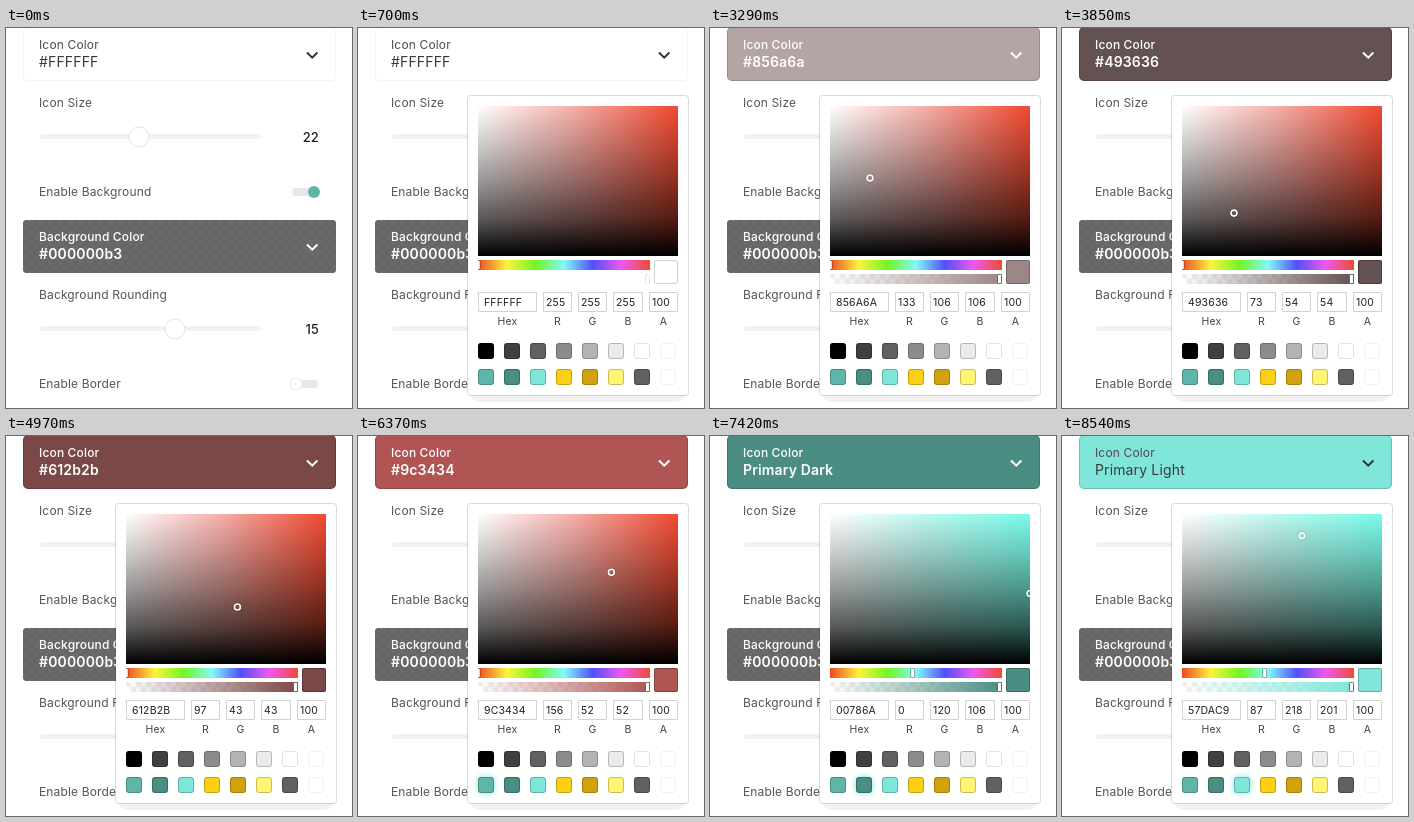
These frames come from a looping animation (346x380 px, 8750 ms). An HTML page with a canvas:

```html
<!DOCTYPE html>
<html lang="en">
<head>
<meta charset="utf-8">
<title>Icon color settings</title>
<style>
  html, body { margin: 0; width: 100%; height: 100%; overflow: hidden; background: #fff; }
  canvas { display: block; width: 346px; height: 380px; }
</style>
</head>
<body>
<canvas id="stage"></canvas>
<script>
const W = 346, H = 380, LOOP = 8750, STEP = 70;
const FONT = 'Inter, "Open Sans", sans-serif';
const canvas = document.getElementById('stage');
const ctx = canvas.getContext('2d');
const dpr = window.devicePixelRatio || 1;
canvas.width = W * dpr;
canvas.height = H * dpr;

const TEAL = [95, 181, 170], TEAL_DARK = [74, 141, 130], TEAL_LIGHT = [128, 230, 218];
const PICKER = { x: 120, y: 78, w: 200, h: 150 };
const STRIP = { x: 120, w: 172 };
const GRAYS = ['#000', '#404040', '#606060', '#8c8c8c', '#b3b3b3', '#ebebeb', '#fff', '#fff'];
const BRAND = [css(TEAL), css(TEAL_DARK), css(TEAL_LIGHT), '#fbcf16', '#d2a20c', '#fff573', '#606060', '#fff'];
const SHADES = [0, 0.25, 0.5, 0.75, 1].map(d => `rgba(0,0,0,${1 - Math.pow(1 - d, 0.75)})`);

// Selected colours: start, fade length, saturation, value; "drag" moves the handle too.
const PICKS = [
  { at: -1, fade: 1, s: 0, v: 1 },
  { at: 3080, fade: 280, s: 0.2, v: 0.52 },
  { at: 3640, fade: 180, s: 0.26, v: 0.286, rgb: [73, 54, 54], drag: true },
  { at: 4060, fade: 420, s: 0.557, v: 0.286, drag: true },
  { at: 4690, fade: 260, s: 0.557, v: 0.38, rgb: [97, 43, 43], drag: true },
  { at: 5180, fade: 350, s: 0.6, v: 0.612, drag: true },
  { at: 5740, fade: 140, s: 0.667, v: 0.612, rgb: [156, 52, 52], drag: true },
  { at: 6440, fade: 140, s: 1, v: 0.659, rgb: [0, 168, 152], shown: TEAL, name: 'Primary' },
  { at: 7000, fade: 210, s: 1, v: 0.47, rgb: [0, 120, 106], shown: TEAL_DARK, name: 'Primary Dark' },
  { at: 7980, fade: 210, s: 0.6, v: 0.855, rgb: [87, 218, 201], shown: TEAL_LIGHT, name: 'Primary Light' }
];
const HOVERS = [6090, 6860, 7770];

function css(c, a = 1) { return `rgba(${c.map(Math.round).join(',')},${a})`; }
function clamp(n) { return Math.max(0, Math.min(1, n)); }
function mix(a, b, p) { return a + (b - a) * p; }
function mixRgb(a, b, p) { return a.map((n, i) => mix(n, b[i], p)); }
function redTone(s, v) { const low = Math.round(255 * v * (1 - s)); return [Math.round(255 * v), low, low]; }
function hex(rgb) { return rgb.map(n => n.toString(16).padStart(2, '0')).join(''); }
function rgbOf(p) { return p.rgb || redTone(p.s, p.v); }
function shownOf(p) { return p.shown || onScreen(rgbOf(p)); }

// Lighter and slightly less saturated, as the colours appear in the panel.
function onScreen(rgb) {
  const light = rgb.map(n => 255 * Math.pow(n / 255, 0.75));
  const top = Math.max(...light);
  return light.map(n => mix(n, top, 0.07));
}

function stateAt(t) {
  const i = PICKS.findLastIndex(p => t >= p.at);
  const now = PICKS[i], prev = PICKS[Math.max(0, i - 1)];
  const p = clamp((t - now.at) / now.fade);
  const moving = now.drag && p < 1;
  const s = moving ? mix(prev.s, now.s, p) : now.s;
  const v = moving ? mix(prev.v, now.v, p) : now.v;
  const rgb = moving ? redTone(s, v) : rgbOf(now);
  const code = hex(rgb);
  return {
    s, v, rgb, code,
    white: i === 0,
    teal: !!now.name,
    label: now.name || '#' + (i ? code : code.toUpperCase()),
    shown: moving ? onScreen(rgb) : shownOf(now),
    header: mixRgb(shownOf(prev), shownOf(now), p),
    dark: rgb[0] * 0.299 + rgb[1] * 0.587 + rgb[2] * 0.114 < 128
  };
}

function box(x, y, w, h, r, fill, stroke) {
  ctx.beginPath();
  ctx.roundRect(x, y, w, h, r);
  if (fill) { ctx.fillStyle = fill; ctx.fill(); }
  if (stroke) { ctx.lineWidth = 1; ctx.strokeStyle = stroke; ctx.stroke(); }
}

// Filled box with a one pixel border inside its edge.
function framed(x, y, w, h, r, fill, stroke) {
  box(x, y, w, h, r, fill);
  box(x + 0.5, y + 0.5, w - 1, h - 1, Math.max(0, r - 0.5), null, stroke);
}

function disc(x, y, r, fill, stroke, width = 1) {
  ctx.beginPath();
  ctx.arc(x, y, r, 0, Math.PI * 2);
  if (fill) { ctx.fillStyle = fill; ctx.fill(); }
  if (stroke) { ctx.lineWidth = width; ctx.strokeStyle = stroke; ctx.stroke(); }
}

function text(str, x, y, size, color = '#555', weight = 400, align = 'left') {
  ctx.font = `${weight} ${size}px ${FONT}`;
  ctx.letterSpacing = '0.15px';
  ctx.textAlign = align;
  ctx.fillStyle = color;
  ctx.fillText(str, x, y);
}

function clipped(x, y, w, h, r, draw) {
  ctx.save();
  ctx.beginPath();
  ctx.roundRect(x, y, w, h, r);
  ctx.clip();
  draw();
  ctx.restore();
}

function checker(x, y, w, h, cell, color) {
  ctx.fillStyle = color;
  for (let r = 0; r * cell < h; r++)
    for (let c = r % 2; c * cell < w; c += 2) ctx.fillRect(x + c * cell, y + r * cell, cell, cell);
}

function gradient(x0, y0, x1, y1, colors) {
  const g = ctx.createLinearGradient(x0, y0, x1, y1);
  colors.forEach((c, i) => g.addColorStop(i / (colors.length - 1), c));
  return g;
}

function heading(title, value, y, dark) {
  text(title, 33, y + 21, 12, dark ? '#fff' : '#4c4c4c', dark ? 500 : 400);
  text(value, 33, y + 39, 14, dark ? '#fff' : '#3a3a3a', dark ? 600 : 400);
  ctx.beginPath();
  ctx.moveTo(301, y + 24.5);
  ctx.lineTo(306.2, y + 29.7);
  ctx.lineTo(311.4, y + 24.5);
  ctx.lineWidth = 2;
  ctx.strokeStyle = dark ? '#fff' : '#333';
  ctx.stroke();
}

function slider(title, y, knob, value) {
  text(title, 33, y, 12);
  box(34, y + 27, 221, 5, 2.5, '#f2f2f2');
  disc(knob, y + 30, 10, '#fff', '#e4e4e4');
  text(value, 313, y + 35, 13, '#222', 500, 'right');
}

function toggle(title, y, on) {
  text(title, 33, y + 4, 12);
  box(286, y - 4, 26, 8, 4, '#e8e8e8');
  if (on) disc(308, y, 6, css(TEAL));
  else disc(290, y, 6, '#fff', '#e6e6e6');
}

function drawPanel(state) {
  framed(17, -1, 313, 54, 5, css(state.header), state.white ? '#f3f3f3' : 'rgba(0,0,0,.16)');
  heading('Icon Color', state.label, 0, state.dark);
  slider('Icon Size', 79, 133, '22');
  toggle('Enable Background', 164, true);
  clipped(17, 192, 313, 53, 4, () => {
    ctx.fillStyle = '#6a6a6a';
    ctx.fillRect(17, 192, 313, 53);
    checker(17, 192, 313, 53, 5, '#666');
  });
  heading('Background Color', '#000000b3', 192, true);
  slider('Background Rounding', 271, 169, '15');
  toggle('Enable Border', 356, false);
}

function drawField(state) {
  const { x, y, w, h } = PICKER;
  const hues = state.teal ? ['#fff', '#b9f9f0', '#78fce8'] : ['#fff', '#f6aaa4', '#f04a30'];
  clipped(x, y, w, h, 0, () => {
    ctx.fillStyle = gradient(x, y, x + w, y, hues);
    ctx.fillRect(x, y, w, h);
    ctx.fillStyle = gradient(x, y, x, y + h, SHADES);
    ctx.fillRect(x, y, w, h);
    const hx = x + w * state.s, hy = y + h * (1 - state.v);
    if (!state.white) disc(hx, hy, 4, null, 'rgba(0,0,0,.3)');
    disc(hx, hy, 3, null, '#fff', 1.6);
  });
}

function drawStrips(state) {
  const { x, w } = STRIP;
  clipped(x, 232, w, 10, 0, () => {
    ctx.fillStyle = gradient(x, 0, x + w, 0,
      ['#ee4a24', '#fdf33c', '#73f520', '#80fafa', '#5050f8', '#ef58f0', '#ee4a34']);
    ctx.fillRect(x, 232, w, 10);
    box(x + (state.teal ? w * 173 / 360 : 0) - 2, 232.5, 4, 9, 1, '#fff', 'rgba(0,0,0,.35)');
  });
  if (!state.white) {
    clipped(x, 246, w, 10, 0, () => {
      checker(x, 246, w, 10, 5, '#f1f1f1');
      ctx.fillStyle = gradient(x, 0, x + w, 0, [css(state.shown, 0), css(state.shown)]);
      ctx.fillRect(x, 246, w, 10);
    });
  }
  box(287.5, 246.5, 4, 9, 1, '#fff', state.white ? '#e6e6e6' : '#666');
  framed(296, 232, 24, 24, 2, css(state.shown), state.white ? '#d0d0d0' : 'rgba(0,0,0,.25)');
}

function drawInputs(state) {
  const fields = [
    [120, 59, 'Hex', state.code.toUpperCase()],
    [185, 29, 'R', state.rgb[0]], [220, 29, 'G', state.rgb[1]],
    [255, 30, 'B', state.rgb[2]], [291, 29, 'A', 100]
  ];
  fields.forEach(([x, w, label, value], i) => {
    framed(x, 264, w, 20, 0, '#fff', '#d2d2d2');
    text(String(value), x + (i ? 3 : 6), 278, 10.5, '#222');
    text(label, x + w / 2, 297, 10.5, '#444', 400, 'center');
  });
}

function drawSwatches(t) {
  const hovered = HOVERS.findLastIndex(at => t >= at);
  [GRAYS, BRAND].forEach((row, r) => row.forEach((color, i) => {
    const x = 120 + i * 26, y = 315 + r * 26;
    ctx.save();
    if (r && i === hovered) {
      ctx.shadowColor = css(TEAL_LIGHT);
      ctx.shadowBlur = 6 * dpr * clamp((t + STEP - HOVERS[i]) / 210);
    }
    box(x, y, 16, 16, 3, color);
    ctx.restore();
    const edge = color !== '#fff' ? 'rgba(0,0,0,.22)' : i === 7 ? '#efefef' : '#e2e2e2';
    box(x + 0.5, y + 0.5, 15, 15, 2.5, null, edge);
  }));
}

function drawPopup(state, t) {
  box(111, 350, 218, 24, [0, 0, 12, 12], '#f2f2f2');
  box(110, 68, 220, 299, 3, '#fff');
  box(109.5, 67.5, 221, 300, 3, null, 'rgba(0,0,0,.14)');
  drawField(state);
  drawStrips(state);
  drawInputs(state);
  drawSwatches(t);
}

function frame(now) {
  const t = Math.floor((now % LOOP) / STEP) * STEP;
  const state = stateAt(t);
  ctx.setTransform(dpr, 0, 0, dpr, 0, 0);
  ctx.fillStyle = '#fff';
  ctx.fillRect(0, 0, W, H);
  drawPanel(state);
  const opacity = clamp((t - 420) / 280);
  if (opacity > 0) {
    ctx.globalAlpha = opacity;
    drawPopup(state, t);
    ctx.globalAlpha = 1;
  }
}

let start;
function tick(now) {
  start ??= now;
  frame(now - start);
  requestAnimationFrame(tick);
}
frame(0);
requestAnimationFrame(tick);
</script>
</body>
</html>
```
